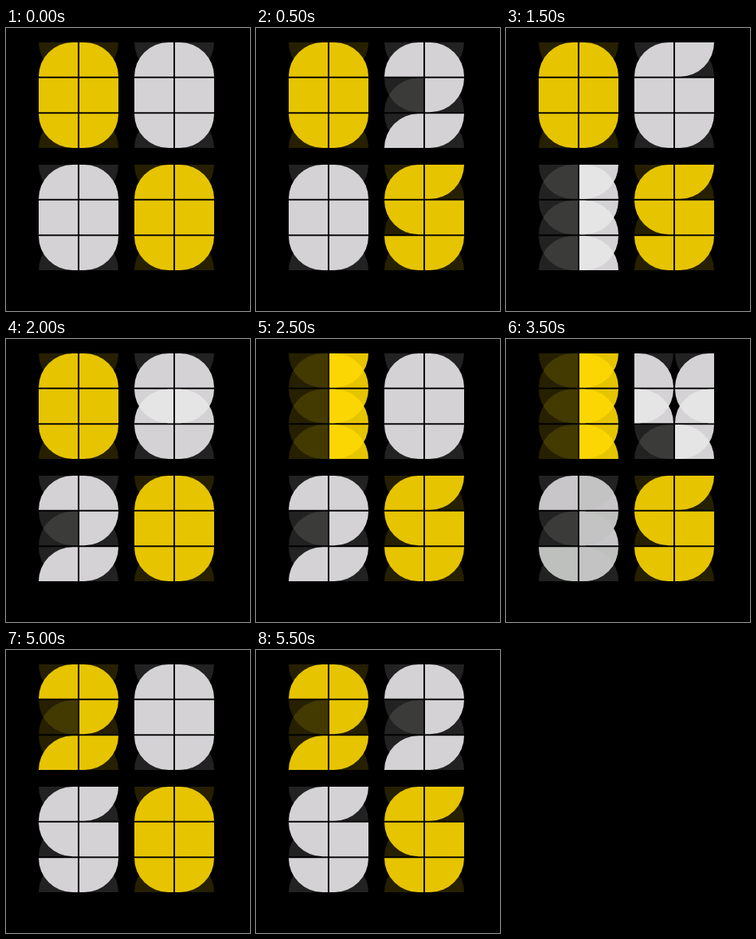
An HTML page with a canvas for the animation above (6000 ms loop, 306 px wide and 354 px high).

```html
<!DOCTYPE html>
<html lang="en">
<head>
<meta charset="utf-8">
<title>Tile clock</title>
<style>
html, body { margin: 0; width: 100%; height: 100%; overflow: hidden; background: #000; }
canvas { display: block; }
</style>
</head>
<body>
<canvas id="stage" width="306" height="354"></canvas>
<script>
const ctx = document.getElementById('stage').getContext('2d');
const STEP = 500, STEPS = 12;
const W = 49, H = 128 / 3, GAP = 2;

// Six tiles per digit, row by row. Each tile holds two quarter-round leaves:
// t = top-rounded lit, b = bottom-rounded lit, x = both, - = none, s = full block.
// Upper case rounds the inner side instead of the outer one.
const DIGITS = {
  0: 'ttssbb', 1: '-x-x-x', 2: 'tt-btb', 3: 'tt-xbb',
  4: 'TTXX-x', 5: 'tbbsbb', 6: 'tbssbb', 8: 'ttxxbb'
};

const YELLOW = { dim: '#262000', dimLens: '#433a02', top: '#e6c400', bottom: '#e6c400', lens: '#fcd602' };
const WHITE = { dim: '#222223', dimLens: '#3b3c3a', top: '#d4d2d5', bottom: '#d4d2d5', lens: '#e5e5e5' };
const GREY = { ...WHITE, top: '#c8c6c9', bottom: '#bec0be', lens: '#c3c3c4' };

function leaf(x, y, left, top) {
  const radii = [0, 0, 0, 0];
  radii[top ? (left ? 0 : 1) : (left ? 3 : 2)] = H;
  ctx.beginPath();
  ctx.roundRect(x, y, W, H, radii);
}

function fillLeaf(x, y, left, top, color) {
  leaf(x, y, left, top);
  ctx.fillStyle = color;
  ctx.fill();
}

function fillLens(x, y, left, color) {
  ctx.save();
  leaf(x, y, left, true);
  ctx.clip();
  fillLeaf(x, y, left, false, color);
  ctx.restore();
}

function tile(x, y, col, code, pal, shaded) {
  const state = code.toLowerCase();
  const left = (col === 0) === (code === state);
  if (state === 's') {
    ctx.fillStyle = pal.top;
    ctx.fillRect(x, y, W, H);
    return;
  }
  fillLeaf(x, y, left, true, pal.dim);
  fillLeaf(x, y, left, false, pal.dim);
  if (state === '-') fillLens(x, y, left, pal.dimLens);
  if (state === 't' || state === 'x') fillLeaf(x, y, left, true, pal.top);
  if (state === 'b' || state === 'x') fillLeaf(x, y, left, false, pal.bottom);
  if (state === 'x' || (shaded && col === 1)) fillLens(x, y, left, pal.lens);
}

function digit(x, y, n, pal) {
  const shaded = n === 3;
  [...DIGITS[n]].forEach((code, i) => {
    const col = i % 2, row = i >> 1;
    tile(x + col * (W + GAP), y + row * (H + GAP), col, code, shaded ? GREY : pal, shaded);
  });
}

function draw(now) {
  const step = Math.floor(now / STEP) % STEPS;
  const hours = step * 2, minutes = step * 5;
  ctx.fillStyle = '#000';
  ctx.fillRect(0, 0, 306, 354);
  digit(41, 18, Math.floor(hours / 10), YELLOW);
  digit(161, 18, hours % 10, WHITE);
  digit(41, 171, Math.floor(minutes / 10), WHITE);
  digit(161, 171, minutes % 10, YELLOW);
}

const start = performance.now();
function loop() {
  draw(performance.now() - start);
  requestAnimationFrame(loop);
}
loop();
</script>
</body>
</html>
```
